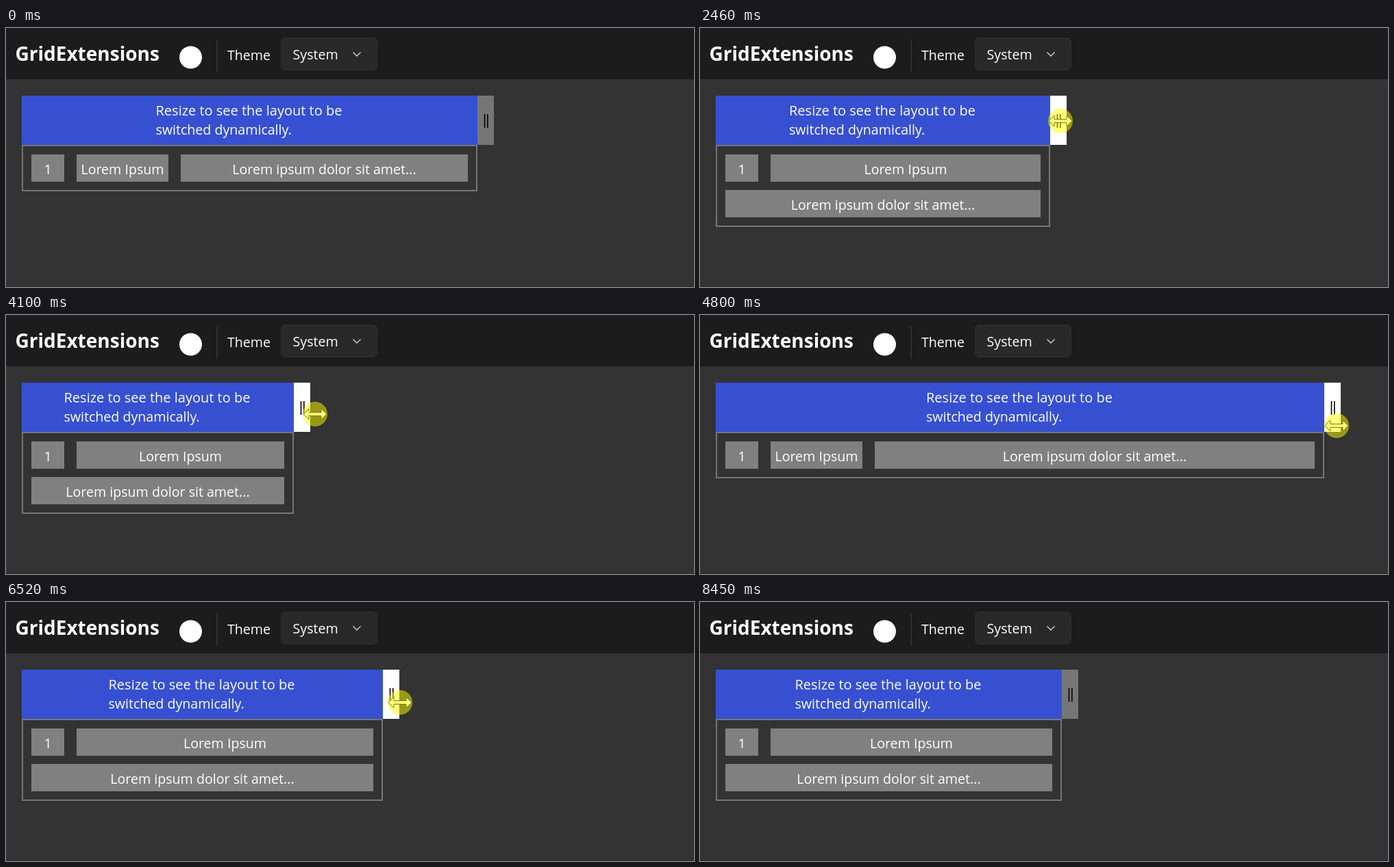
An HTML page for the animation above (9.05 s loop, 1004 by 379 pixels).

```html
<!DOCTYPE html>
<html lang="en">
<head>
<meta charset="utf-8">
<title>GridExtensions</title>
<style>
  html, body { margin: 0; width: 100%; height: 100%; overflow: hidden; background: #333; }
  svg { display: block; width: 1004px; height: 379px; }
  text { font: 19.6px "Open Sans", "Noto Sans", sans-serif; fill: #fff; }
  .title { font-size: 28px; font-weight: 700; }
  .lead { font-size: 20px; }
  .mid { text-anchor: middle; }
  .box { fill: #808080; }
</style>
</head>
<body>
<svg viewBox="0 0 1004 379">
  <rect width="1004" height="379" fill="#333"/>
  <rect y="378" width="1004" height="1" fill="#292929"/>
  <rect width="1004" height="75" fill="#1c1c1c"/>
  <text class="title" x="13.5" y="48">GridExtensions</text>
  <circle cx="269.5" cy="43" r="16.5" fill="#fff"/>
  <rect x="307" y="17" width="2" height="47" fill="#303030"/>
  <text x="323" y="47">Theme</text>
  <rect x="401.5" y="14.5" width="140" height="47" rx="6" fill="#292929" stroke="#303030"/>
  <text x="418.5" y="46">System</text>
  <path d="M506.5 35.5l5.5 5.5 5.5-5.5" fill="none" stroke="#d0d0d0" stroke-width="1.4"/>

  <rect id="banner" x="23" y="99" height="72" fill="#3750d1"/>
  <g id="message">
    <text class="lead" y="128">Resize to see the layout to be</text>
    <text y="156">switched dynamically.</text>
  </g>
  <g id="handle">
    <rect id="grip" y="99" width="24" height="72"/>
    <path d="M10.5 126v20M14.8 126v20" stroke="#000" stroke-width="1.6"/>
  </g>

  <rect id="panel" x="24" y="172" fill="none" stroke="#767676" stroke-width="2"/>
  <rect class="box" x="37" y="185" width="48" height="40"/>
  <text class="mid" x="61" y="214">1</text>
  <rect id="nameBox" class="box" x="103" y="185" height="40"/>
  <text id="name" class="mid" y="214">Lorem Ipsum</text>
  <rect id="bodyBox" class="box" height="40"/>
  <text id="body" class="mid">Lorem ipsum dolor sit amet...</text>

  <g id="cursor">
    <path d="M-17 0L-9 -8V-2.5H9V-8L17 0L9 8V2.5H-9V8Z" fill="#fff" stroke="#000"/>
    <circle r="18" fill="#ff0" fill-opacity=".5"/>
  </g>
</svg>
<script>
  const LOOP = 9050, STEP = 68.8, PHASE = 45;   // ms
  const ENTER = 45, EXIT = 8430;                // pointer on stage
  const HOVER = 240, LEAVE = 8230;              // pointer on the handle
  const LEAD = 50;                              // the handle trails the pointer
  const WRAP_WIDTH = 568;

  // Turning points of the drag: [time, right edge of the panel]
  const edgeAt = curve([
    [480, 688], [1160, 938], [1490, 925], [1630, 843], [1910, 585], [2190, 514],
    [2390, 513], [3290, 414], [4040, 420], [4250, 571], [4520, 775], [4800, 911],
    [5000, 911], [6050, 414], [6310, 416], [6512, 550], [6590, 562],
    [7100, 924], [7220, 923], [7750, 586], [8110, 528]
  ]);
  const heightAt = curve([
    [ENTER, 339], [300, 142], [1630, 141], [3360, 130], [4800, 162],
    [6520, 147], [7770, 158], [8110, 154], [8380, 363]
  ]);
  // Pointer distance from the handle while entering and leaving
  const approachAt = curve([[ENTER, 80], [300, 0], [8110, 0], [8380, 318]]);

  // Monotone cubic through [time, value] pairs
  function curve(keys) {
    const last = keys.length - 1;
    const slope = i => (keys[i + 1][1] - keys[i][1]) / (keys[i + 1][0] - keys[i][0]);
    const tangent = i => {
      if (i === 0 || i === last) return 0;
      const a = slope(i - 1), b = slope(i);
      return a * b > 0 ? 2 * a * b / (a + b) : 0;
    };
    return t => {
      if (t <= keys[0][0]) return keys[0][1];
      if (t >= keys[last][0]) return keys[last][1];
      const i = keys.findIndex(k => k[0] > t) - 1;
      const [t0, v0] = keys[i], [t1, v1] = keys[i + 1];
      const d = t1 - t0, u = (t - t0) / d, e = u * u * (3 - 2 * u);
      return v0 + (v1 - v0) * e
        + d * u * (1 - u) * ((1 - u) * tangent(i) - u * tangent(i + 1));
    };
  }

  const el = {};
  document.querySelectorAll("[id]").forEach(n => { el[n.id] = n; });
  const set = (id, attrs) => {
    for (const key in attrs) el[id].setAttribute(key, attrs[key]);
  };
  const move = (id, x, y) => set(id, { transform: `translate(${x} ${y})` });
  const snap = t => Math.floor((t - PHASE) / STEP) * STEP + PHASE;

  function draw(now) {
    const t = snap(now);
    const right = Math.round(edgeAt(t));
    const inner = right - 14;
    const wrapped = right < WRAP_WIDTH;
    const nameEnd = wrapped ? inner : 237;
    const bodyX = wrapped ? 37 : 255;

    set("banner", { width: right - 23 });
    move("message", (23 + right) / 2 - 137, 0);
    move("handle", right, 0);
    set("grip", { fill: t >= HOVER && t < LEAVE ? "#fff" : "#767676" });
    set("panel", { width: right - 25, height: wrapped ? 118 : 66 });
    set("nameBox", { width: nameEnd - 103 });
    set("name", { x: (103 + nameEnd) / 2 });
    set("bodyBox", { x: bodyX, y: wrapped ? 237 : 185, width: inner - bodyX });
    set("body", { x: (bodyX + inner) / 2, y: wrapped ? 266 : 214 });

    set("cursor", { visibility: t >= ENTER && t < EXIT ? "visible" : "hidden" });
    move("cursor", Math.round(edgeAt(t + LEAD) + 18 + approachAt(t)), Math.round(heightAt(t)));
  }

  const begin = performance.now();
  function tick() {
    draw((performance.now() - begin) % LOOP);
    requestAnimationFrame(tick);
  }
  tick();
</script>
</body>
</html>
```
